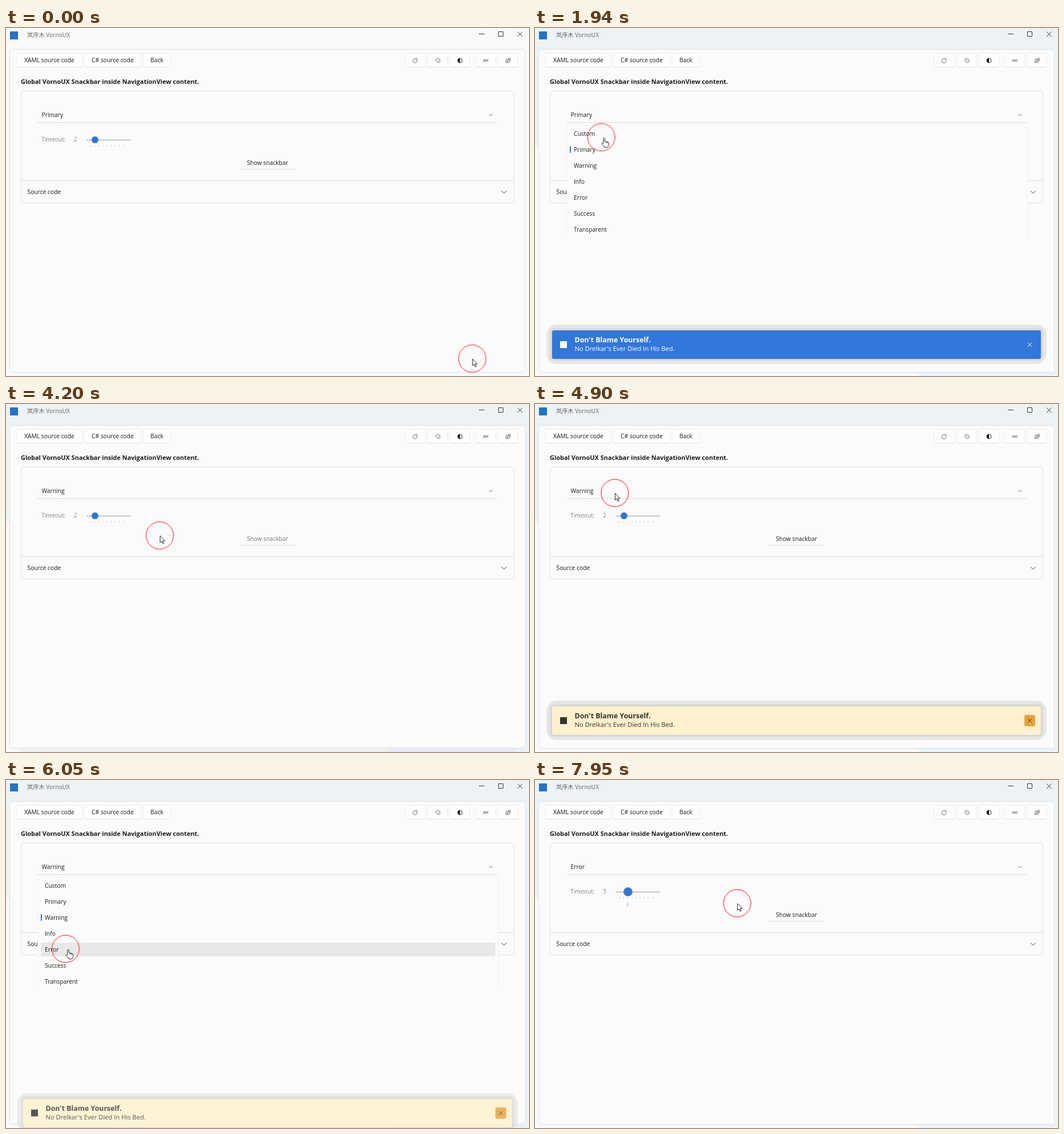
Animation, 917 px wide and 610 px high, one loop 8 s. Source, as an HTML page:

```html
<!DOCTYPE html>
<html lang="en">
<head>
<meta charset="utf-8">
<title>Snackbar demo</title>
<style>
  html, body { margin: 0; width: 100%; height: 100%; overflow: hidden; background: #f9f9f9; }
  body { position: relative; font: 10.3px/16px "Open Sans", "Noto Sans CJK SC", "Noto Sans CJK", sans-serif; color: #1b1b1b; white-space: nowrap; }
  div, span, b, svg { position: absolute; box-sizing: border-box; }
  svg { left: 0; top: 0; overflow: visible; fill: none; stroke: #333; }

  /* Every animation shares one 8 s loop: 1% = 80 ms */
  .mica, .pop, .snack, .pick, .cursor, .cursor *, .row, .bar, .chevron, .show, .thumb, .tip, .close { animation: 8s linear infinite; }

  .mica { inset: 0; background: #edf2f7; clip-path: polygon(0 0, 100% 0, 100% 100%, 676px 100%, 0 205px); animation-name: mica; animation-timing-function: step-end; }
  .page { left: 6px; top: 37px; width: 905px; height: 567px; border: 1px solid #dfe1e3; border-radius: 6px; background: #fbfbfb; }
  .card { left: 26px; top: 110px; width: 865px; height: 197px; border: 1px solid #dfdfdf; border-radius: 5px; }
  .rule { left: 27px; top: 267px; width: 863px; height: 1px; background: #dcdcdc; }
  .btn { top: 44px; height: 25px; border: 1px solid #ececec; border-bottom-color: #e2e2e2; border-radius: 3px; line-height: 22px; text-align: center; background: #fdfdfd; }
  .line { border: 1px solid transparent; border-bottom-color: #dadada; border-radius: 3px; }
  .muted { color: #858585; }

  .slot { height: 16px; width: 60px; overflow: hidden; }
  .pick { left: 0; top: 0; white-space: pre; animation-timing-function: step-end; }
  .kind { animation-name: kind; }
  .seconds { animation-name: seconds; }
  .show { left: 411px; top: 228px; width: 95px; text-align: center; animation-name: press; }
  .thumb { left: 149.5px; top: 190px; width: 12px; height: 12px; border-radius: 50%; background: #2f75d6; animation-name: thumb; }
  .tip { left: 159px; top: 211px; font-size: 9.5px; color: #b4b4b4; animation-name: tip; animation-timing-function: step-end; }
  .chevron { transform-origin: 850px 152.5px; animation-name: chevron; animation-timing-function: step-end; }

  .clip { left: 55px; top: 167px; width: 809px; height: 203px; overflow: hidden; }
  .pop { inset: 0 0 3px; background: #fbfbfb; border: solid #f1f1f1; border-width: 0 1px; animation-name: pop; }
  .items { left: 12px; top: 4px; line-height: 28px; white-space: pre; }
  .row { left: 5px; top: 34px; width: 797px; height: 24px; border-radius: 3px; background: #e8e8e8; animation-name: row; animation-timing-function: step-end; }
  .bar { left: 5px; top: 40px; width: 2px; height: 12px; border-radius: 1px; background: #2f75d6; animation-name: bar; animation-timing-function: step-end; }

  .snack { left: 30px; top: 530px; width: 857px; height: 50px; animation-name: slide; }
  .halo { inset: -10px -10px -9px; border-radius: 18px; background: #e7e7e7; }
  .halo::after { content: ""; position: absolute; inset: 5px; border-radius: 9px; background: #e0e0e0; }
  .face { inset: 0; border-radius: 3px; box-shadow: 0 0 4px #c0c0c0; animation: theme 8s step-end infinite; }
  .emblem { left: 14px; top: 19px; width: 12px; height: 12px; background: currentColor; }
  .close { left: 828px; top: 15px; width: 19px; height: 20px; border-radius: 3px; animation-name: close; animation-timing-function: step-end; }
  .close svg { stroke: currentColor; }

  .cursor { animation-name: move; }
  .arrow, .hand { stroke: #222; fill: #fff; animation-timing-function: step-end; }
  .arrow { animation-name: arrow; }
  .hand { animation-name: hand; }

  @keyframes mica { 0% { opacity: 0 } 8.75%, 100% { opacity: 1 } }
  @keyframes kind { 0% { transform: none } 40.5% { transform: translateY(-16px) } 82.5%, 100% { transform: translateY(-32px) } }
  @keyframes seconds { 0% { transform: none } 93.75%, 100% { transform: translateY(-16px) } }
  @keyframes chevron {
    0%, 40.5%, 82.5%, 100% { transform: none }
    17.875%, 61.25% { transform: scaleY(-1) }
  }
  @keyframes press {
    0%, 8.5%, 11.5%, 49.5%, 55%, 100% { color: #1b1b1b }
    8.75%, 10%, 50%, 52.6% { color: #777 }
  }
  @keyframes thumb {
    0%, 92.5% { transform: none }
    93.75%, 100% { transform: translateX(7px) scale(1.3) }
  }
  @keyframes tip { 0% { opacity: 0 } 93.75%, 100% { opacity: 1 } }
  @keyframes pop {
    0%, 18.5%, 39.875%, 61.875%, 81.875%, 100% { transform: translateY(-100%) }
    20.4%, 39.874%, 63.75%, 81.874% { transform: none }
  }
  @keyframes row {
    0% { opacity: 0; transform: none }
    24.375% { opacity: 1; transform: none }
    27.375% { opacity: 1; transform: translateY(28px) }
    45% { opacity: 0; transform: none }
    66.25% { opacity: 1; transform: none }
    71.125% { opacity: 1; transform: translateY(56px) }
    73%, 100% { opacity: 1; transform: translateY(84px) }
  }
  @keyframes bar { 0% { transform: none } 45%, 100% { transform: translateY(28px) } }
  @keyframes slide {
    0%, 9.3%, 36.13%, 52.3%, 77.5%, 100% { opacity: 0; transform: translateY(88px) }
    9.375%, 52.375% { opacity: .3; transform: translateY(88px); animation-timing-function: ease-out }
    11.9%, 33.6%, 55%, 75% { opacity: 1; transform: none }
    36.125%, 77.49% { opacity: .3; transform: translateY(112px) }
  }
  @keyframes theme {
    0% { background: #3277d9; color: #fff }
    45%, 100% { background: #fff1ce; color: #333 }
  }
  @keyframes close { 0% { background: transparent } 45%, 100% { background: #e8a33b } }
  @keyframes arrow { 0%, 39.875%, 81.875%, 100% { opacity: 1 } 23.125%, 65.625% { opacity: 0 } }
  @keyframes hand { 0%, 39.875%, 81.875%, 100% { opacity: 0 } 23.125%, 65.625% { opacity: 1 } }
  @keyframes move {
    0% { transform: translate(817.5px, 579.5px); animation-timing-function: ease-in-out }
    6.875%, 10.6% { transform: translate(452px, 236px); animation-timing-function: ease-in-out }
    15.8%, 21% { transform: translate(141px, 146px); animation-timing-function: ease-in-out }
    27.375% { transform: translate(93.5px, 233.5px) }
    28%, 29.3% { transform: translate(128px, 243px) }
    29.875% { transform: translate(126.5px, 244px) }
    33.6%, 41.2% { transform: translate(126.5px, 245.5px); animation-timing-function: ease-in-out }
    48.75%, 50.3% { transform: translate(450px, 236px) }
    52.5% { transform: translate(270px, 230.5px); animation-timing-function: ease-out }
    60% { transform: translate(150px, 193px) }
    61.25%, 63.75% { transform: translate(140px, 156px) }
    68.5% { transform: translate(112.5px, 271.5px); animation-timing-function: ease-out }
    73%, 83% { transform: translate(104.5px, 296px); animation-timing-function: ease-in-out }
    91.25% { transform: translate(152px, 210px) }
    92.5% { transform: translate(153px, 207px) }
    95.625%, 98.125% { transform: translate(170.5px, 201px) }
    98.75% { transform: translate(235px, 207px) }
    99.375%, 100% { transform: translate(354.5px, 216px) }
  }
</style>
</head>
<body>
  <div class="mica"></div>
  <div class="page"></div>

  <div style="left:7px;top:6px;width:14px;height:14px;background:#2273c3"></div>
  <span style="left:37px;top:4px;font-size:10.2px;color:#666">岚序木 VornoUX</span>

  <div class="btn" style="left:18px;width:116px">XAML source code</div>
  <div class="btn" style="left:137px;width:100px">C# source code</div>
  <div class="btn" style="left:240px;width:49px">Back</div>
  <div class="btn" style="left:699px;width:37px"></div>
  <div class="btn" style="left:739px;width:36px"></div>
  <div class="btn" style="left:778px;width:36px"></div>
  <div class="btn" style="left:823px;width:36px"></div>
  <div class="btn" style="left:862px;width:36px"></div>

  <b style="left:26px;top:86px;font-size:10.95px">Global VornoUX Snackbar inside NavigationView content.</b>
  <div class="card"></div>
  <div class="rule"></div>
  <span style="left:37.5px;top:279px">Source code</span>

  <div class="line" style="left:54px;top:139px;width:809px;height:27px"></div>
  <div class="slot" style="left:62.5px;top:144px"><div class="pick kind">Primary
Warning
Error</div></div>

  <span class="muted" style="left:62px;top:187px">Timeout:</span>
  <div class="slot muted" style="left:119px;top:187px;width:12px"><div class="pick seconds">2
3</div></div>
  <div style="left:141px;top:194.5px;width:79px;height:3px;border-radius:2px;background:#d6d6d6"></div>
  <div style="left:148px;top:205px;width:59px;height:3px;background:repeating-linear-gradient(90deg,#d0d0d0 0 1px,transparent 1px 7.2px)"></div>
  <div class="thumb"></div>
  <span class="tip">3</span>

  <div class="line" style="left:410px;top:224px;width:97px;height:24px"></div>
  <span class="show">Show snackbar</span>

  <svg width="917" height="610">
    <path d="M829 10.5h10M863.5 6.5h8v8h-8zM897 6.5l8.5 8.5m0-8.5l-8.5 8.5"/>
    <path d="M869 285.5l4.2 4.2 4.2-4.2"/>
    <g stroke="#555" stroke-width=".9">
      <path d="M718.5 54a3.7 3.7 0 1 0 2 2.3M718 53.5h2.5v2.5"/>
      <path d="M753.5 56.5c0-4 7.5-4 7.5 .5 0 4-4 5-3.8 2.5 .2-2-3.7-.5-3.7-3zM756 55.5h1m1 1.5h1"/>
      <circle cx="796" cy="57" r="4" stroke="#222"/>
      <path d="M796 53a4 4 0 0 0 0 8z" fill="#222" stroke="none"/>
      <circle cx="839" cy="57" r="1.7"/><circle cx="843.5" cy="57" r="1.7"/>
      <circle cx="878" cy="59.5" r="1.7"/><path d="M880.5 53.5h4v3h-4zM880 55h-3v2.5m2.7 2h3v-3"/>
    </g>
    <path class="chevron" d="M847 151l3 3 3-3" stroke="#777"/>
  </svg>

  <div class="clip"><div class="pop">
    <div class="row"></div>
    <div class="bar"></div>
    <div class="items">Custom
Primary
Warning
Info
Error
Success
Transparent</div>
  </div></div>

  <div class="snack">
    <div class="halo"></div>
    <div class="face">
      <div class="emblem"></div>
      <b style="left:39.5px;top:9px;font-size:12.4px">Don't Blame Yourself.</b>
      <span style="left:39.5px;top:24px;font-size:11.2px">No Drelkar's Ever Died In His Bed.</span>
      <div class="close"><svg width="20" height="20"><path d="M6 6.5l7 7m0-7l-7 7"/></svg></div>
    </div>
  </div>

  <svg class="cursor" width="1" height="1">
    <circle r="24" stroke="#f80c10"/>
    <path class="arrow" d="M.5 .5v12l2.8-2.5 2 4.5 1.8-.8-2-4.3h3.8z"/>
    <path class="hand" d="M3.5 10.5V2.2a1.2 1.2 0 0 1 2.4 0V7l5 1q2.3 .4 2.3 2.5v2.5q0 2.500-1.700 4.500H5.500Q4.500 15 1 11.800q-.5-1.500 .8-1.800zM8.300 7.500v2.500m2.400-2v2.500"/>
  </svg>
</body>
</html>
```
